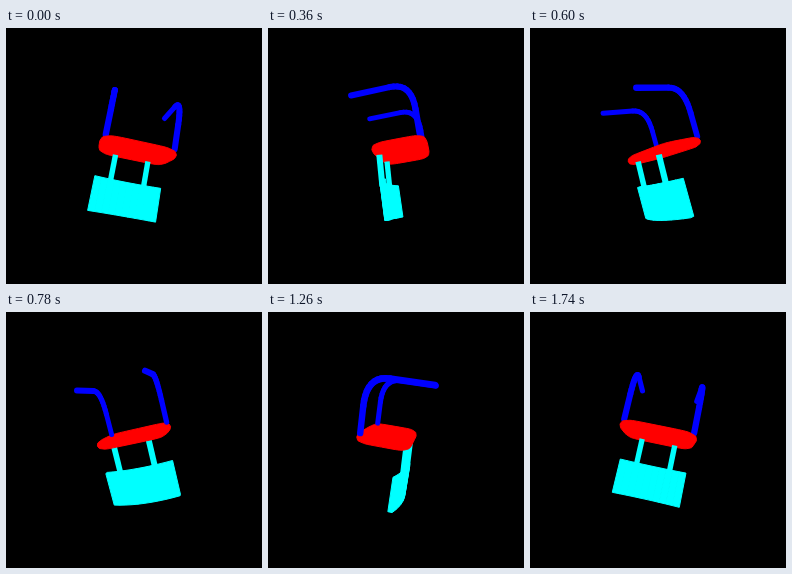
Animation of 256 by 256 pixels, one loop 1800 ms. Source, as an HTML page with a canvas:

```html
<!DOCTYPE html>
<html lang="en">
<head>
<meta charset="utf-8">
<title>Turning chair</title>
<style>
  html, body { margin: 0; width: 100%; height: 100%; overflow: hidden; background: #000; }
  canvas { display: block; width: 100vw; height: 100vh; }
</style>
</head>
<body>
<canvas id="stage" width="256" height="256"></canvas>
<script>
const ctx = document.getElementById('stage').getContext('2d');
const LOOP = 1800, STEPS = 30;
const RAD = Math.PI / 180;
const VIEW = 250;                 // camera distance
const TILT = 15.5 * RAD;          // lean of the chair from the turning axis
const RED = '#f00', BLUE = '#00f', CYAN = '#0ff';

// Model points are [side, up, front]; the chair hangs with its legs upward.
let axes;

function turn(angle) {
  const heading = (angle + 9) * RAD, lean = (angle + 140) * RAD;
  const hx = Math.sin(lean), hz = Math.cos(lean);
  const sin = Math.sin(TILT), cos = Math.cos(TILT);
  const tilted = (x, z) => {
    const d = x * hx + z * hz;
    return [x + d * (cos - 1) * hx, -d * sin, z + d * (cos - 1) * hz];
  };
  axes = [
    tilted(Math.cos(heading), -Math.sin(heading)),
    [sin * hx, cos, sin * hz],
    tilted(Math.sin(heading), Math.cos(heading))
  ];
}

function project(p) {
  const [x, y, z] = [0, 1, 2].map(i =>
    p[0] * axes[0][i] + p[1] * axes[1][i] + p[2] * axes[2][i]);
  const s = VIEW / (VIEW - z);
  return { x: 128 + x * s, y: 128 - y * s, s };
}

function hull(points) {
  const sorted = points.slice().sort((a, b) => a.x - b.x || a.y - b.y);
  const half = list => {
    const out = [];
    for (const p of list) {
      while (out.length > 1) {
        const a = out[out.length - 2], b = out[out.length - 1];
        if ((b.x - a.x) * (p.y - a.y) - (b.y - a.y) * (p.x - a.x) > 0) break;
        out.pop();
      }
      out.push(p);
    }
    out.pop();
    return out;
  };
  return half(sorted).concat(half(sorted.reverse()));
}

function solid(points, color) {
  ctx.fillStyle = ctx.strokeStyle = color;
  ctx.lineWidth = 1;
  ctx.lineJoin = 'round';
  ctx.beginPath();
  for (const p of hull(points.map(project))) ctx.lineTo(p.x, p.y);
  ctx.closePath();
  ctx.fill();
  ctx.stroke();
}

function tube(points, width, color, cap) {
  const line = points.map(project);
  ctx.strokeStyle = color;
  ctx.lineCap = cap;
  for (let i = 1; i < line.length; i++) {
    const a = line[i - 1], b = line[i];
    ctx.lineWidth = width * (a.s + b.s) / 2;
    ctx.beginPath();
    ctx.moveTo(a.x, a.y);
    ctx.lineTo(b.x, b.y);
    ctx.stroke();
  }
}

// Bent tube: straight up, a round bend, then toward the back.
const legPath = [[8, 28]];
for (let i = 0; i <= 10; i++) {
  const t = i / 10, r = 1 - t;
  legPath.push([32 * r * r + 58 * (1 - r * r), 28 * (1 - t * t) + 8 * t * t]);
}
legPath.push([58, -29.5]);

// Cushion: rounded rectangle in layers that shrink toward both faces.
const seat = [];
const power = v => Math.sign(v) * Math.abs(v) ** (1 / 3);
for (const [up, size] of [[-1.5, 0.85], [0.5, 0.97], [3.2, 1], [6, 0.97], [8, 0.85]]) {
  for (let a = 0; a < 360; a += 6) {
    seat.push([36 * size * power(Math.cos(a * RAD)), up,
               7.5 + 25.5 * size * power(Math.sin(a * RAD))]);
  }
}

function drawLegs() {
  for (const side of [-32, 32]) {
    tube(legPath.map(([up, front]) => [side, up, front]), 5.6, BLUE, 'round');
  }
}

function drawSeat() {
  solid(seat, RED);
}

function drawBack() {
  for (const side of [-17.5, 17.5]) {
    tube([[side, 0, -13], [side, -30, -14]], 5.6, CYAN, 'butt');
  }
  const rim = side => {
    const front = -13.5 + 6.5 * (side / 34) ** 2;
    return [[-26, 0], [-26, -4], [-60, 0], [-60, -4]]
      .map(([up, depth]) => [side, up, front + depth]);
  };
  const count = 10, width = 68 / count;
  for (let i = 0; i < count; i++) {
    const side = -34 + i * width;
    solid(rim(side).concat(rim(side + width)), CYAN);
  }
}

function draw(time) {
  const step = Math.floor((time % LOOP) / LOOP * STEPS);
  turn(step * 360 / STEPS);
  ctx.fillStyle = '#000';
  ctx.fillRect(0, 0, 256, 256);
  // The side of the seat that faces the camera is painted last.
  const legsFacing = axes[1][2] * VIEW > 4;
  const parts = [drawLegs, drawSeat, drawBack];
  if (legsFacing) parts.reverse();
  for (const part of parts) part();
}

const start = performance.now();
function tick() {
  draw(performance.now() - start);
  requestAnimationFrame(tick);
}
tick();
</script>
</body>
</html>
```
